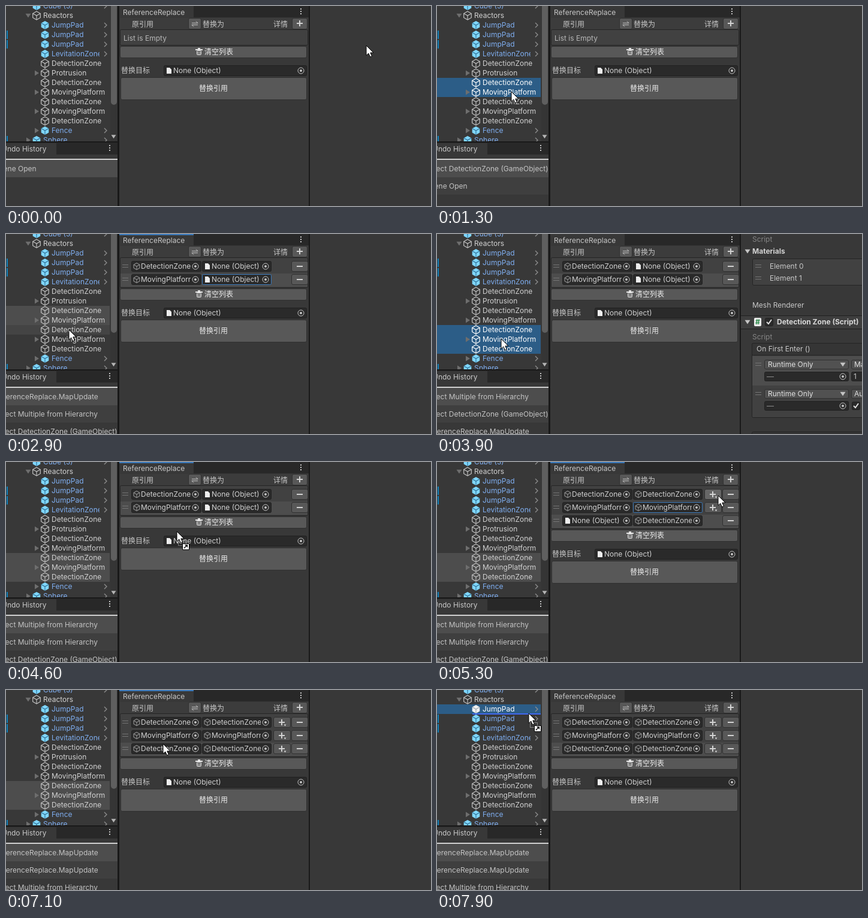
Write an HTML page with a canvas that moves like this. It is 709x334 px and loops after 8000 ms.

```html
<!DOCTYPE html>
<html lang="zh">
<head>
<meta charset="utf-8">
<style>
html, body { margin: 0; width: 100%; height: 100%; overflow: hidden; background: #383838; }
canvas { display: block; }
</style>
</head>
<body>
<canvas id="stage" width="709" height="334"></canvas>
<script>
const c = document.getElementById('stage').getContext('2d');
const FONT = '12px Inter, "Noto Sans CJK SC", "Noto Sans CJK", sans-serif';
const LOOP = 8000, STEP = 100;
const LIGHT = '#d2d2d2', ICON = '#c4c4c4', EDGE = '#242424', BLUE = '#3a79bb';
const DZ = 'DetectionZone', MP = 'MovingPlatform';
const MULTI = 'Select Multiple from Hierarchy';
const SELECT = 'Select DetectionZone (GameObject)';
const UPDATE = 'ReferenceReplace.MapUpdate';

const tree = ['Cube (3)', 'Reactors', 'JumpPad', 'JumpPad', 'JumpPad', 'LevitationZone', DZ,
  'Protrusion', DZ, MP, DZ, MP, DZ, 'Fence', 'Sphere'];
const roots = ['Cube (3)', 'Reactors', 'Sphere'];
const plain = ['Reactors', DZ, MP, 'Protrusion'];
const folded = ['Protrusion', MP, 'Fence', 'Sphere'];

// pointer moves: from time, to time, x, y
const moves = [
  [0, 600, 124, 134], [1000, 1200, 124, 143], [1700, 2200, 478, 50], [2400, 2900, 105, 160],
  [3300, 3600, 107, 190], [3700, 3900, 107, 175], [4300, 4900, 463, 56], [5200, 5300, 469, 56],
  [5300, 6100, 146, 94], [6500, 6800, 276, 97], [7000, 7500, 143, 33], [7700, 7900, 153, 39]
];

// each event overrides part of the state; "log" adds a history entry
const events = [
  [0, { picks: [], rows: [], log: 'Scene Open' }],
  [800, { picks: [8] }],
  [1000, { log: SELECT, inspect: true }],
  [1200, { picks: [8, 9], inspect: false }],
  [1400, { log: MULTI }],
  [1700, { drag: true }],
  [2000, { focus: true }],
  [2400, { drag: false, ring: true, rows: [[DZ], [MP]] }],
  [2500, { log: UPDATE }],
  [3000, { picks: [10], focus: false, ring: false }],
  [3200, { inspect: true }],
  [3300, { log: SELECT }],
  [3600, { picks: [10, 11, 12] }],
  [3700, { log: MULTI }],
  [4000, { log: MULTI, inspect: false }],
  [4300, { drag: true }],
  [4600, { focus: true }],
  [5300, { drag: false, ring: true, rows: [[DZ, DZ], [MP, MP], ['', DZ]] }],
  [5400, { log: UPDATE }],
  [6200, { picks: [6], focus: false, ring: false }],
  [6300, { drag: true }],
  [6700, { focus: true }],
  [7000, { picks: [10, 11, 12], drag: false, rows: [[DZ, DZ], [MP, MP], [DZ, DZ]] }],
  [7100, { log: UPDATE }],
  [7700, { picks: [2], focus: false }],
  [7800, { drag: true }],
  [7900, { insert: true }]
];

function stateAt(t) {
  const due = events.filter(e => e[0] <= t).map(e => e[1]);
  const s = Object.assign({}, ...due);
  s.log = due.map(e => e.log).filter(Boolean).reverse();
  s.tip = moves.reduce(([x, y], [a, b, toX, toY]) => {
    const k = Math.min(1, Math.max(0, (t - a) / (b - a))), ease = k * k * (3 - 2 * k);
    return [x + (toX - x) * ease, y + (toY - y) * ease];
  }, [601, 66]).map(Math.round);
  return s;
}

function rect(x, y, w, h, fill) { c.fillStyle = fill; c.fillRect(x, y, w, h); }

function box(x, y, w, h, fill, edge = EDGE, r = 2) {
  c.beginPath();
  c.roundRect(x + .5, y + .5, w - 1, h - 1, r);
  c.fillStyle = fill; c.fill();
  c.strokeStyle = edge; c.lineWidth = 1; c.stroke();
}
const button = (x, y, w, h, fill = '#585858') => box(x, y, w, h, fill, '#303030', 2.5);
const inset = (x, y, w, h, edge = '#202020') => box(x, y, w, h, '#2a2a2a', edge);

function text(s, x, y, color = '#c8c8c8', bold = false, right = 709) {
  c.save();
  c.beginPath(); c.rect(0, 0, right, 334); c.clip();
  c.font = (bold ? 'bold ' : '') + FONT;
  c.fillStyle = color;
  c.fillText(s, x, y + 4);
  c.restore();
}

function shape(points, fill, edge, width = 1, close = true) {
  c.beginPath();
  points.forEach(([x, y]) => c.lineTo(x, y));
  if (close) c.closePath();
  if (fill) { c.fillStyle = fill; c.fill(); }
  if (edge) { c.strokeStyle = edge; c.lineWidth = width; c.stroke(); }
}
const line = (points, color, width = 1) => shape(points, null, color, width, false);

function cube(x, y, r, fill, edge) {
  const w = r * .9, h = r / 2;
  shape([[x, y - r], [x + w, y - h], [x + w, y + h], [x, y + r], [x - w, y + h], [x - w, y - h]],
    fill, fill ? null : edge, 1.2);
  line([[x - w, y - h], [x, y], [x + w, y - h]], edge, 1.1);
  line([[x, y], [x, y + r]], edge, 1.1);
}

function down(x, y, color = ICON, r = 4.5) { shape([[x - r, y - r * .7], [x + r, y - r * .7], [x, y + r * .8]], color); }
function right(x, y, color) { shape([[x - 3, y - 4.5], [x + 4, y], [x - 3, y + 4.5]], color); }
function kebab(x, y) { for (const d of [-4, 0, 4]) rect(x - 1, y + d - 1, 2, 2, ICON); }
function grip(x, y) { for (const d of [-3, 1]) rect(x, y + d, 10, 1, '#757575'); }

function sign(x, y, plus) {
  rect(x - 5, y - 1, 10, 2, LIGHT);
  if (plus) rect(x - 1, y - 5, 2, 10, LIGHT);
}

function picker(x, y) {
  c.strokeStyle = c.fillStyle = ICON;
  c.lineWidth = 1;
  c.beginPath(); c.arc(x, y, 5, 0, 7); c.stroke();
  c.beginPath(); c.arc(x, y, 2, 0, 7); c.fill();
}

function check(x, y) {
  inset(x, y, 14, 14);
  line([[x + 3, y + 7], [x + 6, y + 10], [x + 11, y + 3]], '#e0e0e0', 2);
}

function field(x, y, w, name, ring) {
  inset(x, y - 9, w, 18, ring ? BLUE : undefined);
  if (name) cube(x + 9, y, 5.5, null, '#8c8c8c');
  else shape([[x + 5, y - 5], [x + 10, y - 5], [x + 13, y - 2], [x + 13, y + 5], [x + 5, y + 5]], '#eeeeee');
  text(name || 'None (Object)', x + 16, y, LIGHT, false, x + w - 18);
  picker(x + w - 10, y);
}

function hierarchy({ picks, focus, drag, insert, tip }) {
  c.save();
  c.beginPath(); c.rect(0, 0, 187, 226); c.clip();
  const hover = drag || tip[0] > 173 ? -1 : Math.floor((tip[1] + 8) / 16);
  tree.forEach((name, i) => {
    const y = i * 16, root = roots.includes(name), prefab = !plain.includes(name);
    const picked = picks.includes(i), bright = picked && !focus, x = root ? 51 : 65;
    if (picked) rect(0, y - 8, 173, 16, focus ? '#4d4d4d' : '#2c5d87');
    else if (i === hover) rect(0, y - 8, 173, 16, '#444444');

    if (name === 'Reactors') down(x - 14, y, '#6e6e6e');
    if (folded.includes(name)) right(x - 14, y, '#6e6e6e');
    if (prefab) {
      cube(x, y, 7, bright ? '#f0f0f0' : '#7fd6fd', bright ? '#9aa6b0' : '#2f6f92');
      line([[164, y - 4], [168, y], [164, y + 4]], '#8c8c8c', 1.4);
    } else cube(x, y, 7, null, bright ? '#ffffff' : ICON);
    text(name, x + 11, y, bright ? '#ffffff' : prefab ? '#7faef0' : LIGHT, false, prefab ? 156 : 173);
    if ([3, 4, 14].includes(i)) rect(1, y - 7, 2, 14, '#0f81be');
  });
  rect(174, 0, 12, 226, '#353535');
  c.beginPath(); c.roundRect(175, -10, 10, 175, 5);
  c.fillStyle = '#5f5f5f'; c.fill();
  down(179.5, 218, '#b4b4b4', 4);
  if (insert) line([[59, 40], [173, 40]], '#4168f0', 2);
  c.restore();
}

function history({ log }) {
  rect(0, 226, 187, 2, '#191919');
  rect(0, 228, 187, 20, '#282828');
  rect(0, 229, 84, 19, '#383838');
  text('Undo History', -7, 239);
  kebab(173, 237);
  rect(0, 255, 186, 2, '#d0d0d0');
  log.slice(0, 3).forEach((name, i) => {
    const y = 257 + i * 29;
    rect(0, y, 186, 29, ['#4d4d4d', '#3f3f3f', '#383838'][i]);
    text(name, -19, y + 15, ICON, false, 186);
  });
}

function mapping([from, to], i, last, { ring, drag, tip }) {
  const y = 54 + i * 22;
  if (last) rect(191, y - 10, 312, 22, '#4d4d4d');
  grip(194, y);
  field(209, y, 117, from);
  field(327, y, 116, to, ring && i === 1);
  if (from && to) {
    const hot = !drag && Math.abs(tip[0] - 460) < 14 && Math.abs(tip[1] - y) < 9;
    button(446, y - 9, 29, 18, hot ? '#676767' : undefined);
    sign(460, y, true);
    down(465.5, y + 5, LIGHT, 2);
  }
  button(476, y - 9, 28, 18);
  sign(490, y, false);
}

function replacer(s) {
  const count = s.rows.length, shift = count && count * 22 - 20;
  rect(189, 0, 317, 19, '#282828');
  rect(189, 0, 124, 20, '#383838');
  if (s.focus) rect(189, 0, 124, 2, BLUE);
  text('ReferenceReplace', 195, 11);
  kebab(492, 9);

  rect(190, 20, 314, 19, '#3c3c3c');
  text('原引用', 210, 31);
  text('替换为', 328, 31);
  text('详情', 446, 31);
  button(304, 20, 22, 19);
  line([[310, 28.5], [320, 28.5], [317, 25.5]], ICON);
  line([[320, 31.5], [310, 31.5], [313, 34.5]], ICON);
  button(477, 20, 26, 19);
  sign(490, 29, true);

  box(190, 39, 314, 27 + shift, '#414141');
  if (!count) text('List is Empty', 196, 54, '#b8b8b8');
  s.rows.forEach((row, i) => mapping(row, i, i === count - 1, s));

  c.save();
  c.translate(0, shift);
  button(190, 67, 312, 20);
  box(318, 74, 8, 8, '#585858', '#e4e4e4', 1);
  rect(316, 72, 12, 2, '#e4e4e4');
  rect(320, 70, 4, 2, '#e4e4e4');
  for (const x of [320, 323]) rect(x, 76, 1, 5, '#e4e4e4');
  text('清空列表', 331, 77, '#eeeeee');
  text('替换目标', 192, 108);
  field(263, 108, 239, '');
  button(191, 119, 311, 38);
  text('替换引用', 322, 138, '#eeeeee');
  c.restore();
}

function inspector() {
  const dim = '#858585';
  text('Script', 526, 9, dim);
  down(518, 29);
  text('Materials', 526, 29, LIGHT, true);
  box(526, 41, 190, 45, '#414141');
  for (const i of [0, 1]) {
    grip(531, 54 + i * 20);
    text('Element ' + i, 555, 54 + i * 20);
  }
  text('Mesh Renderer', 526, 119);

  rect(507, 136, 202, 23, '#1f1f1f');
  rect(507, 137, 202, 21, '#3e3e3e');
  down(518, 147);
  box(529, 140, 12, 14, '#e8e8e8', '#f4f4f4', 1);
  text('#', 531, 147, '#2c8a4a', true);
  check(547, 140);
  text('Detection Zone (Script)', 567, 147, '#d8d8d8', true);
  text('Script', 526, 172, dim);

  box(525, 182, 190, 125, '#414141');
  box(525, 182, 190, 21, '#353535');
  text('On First Enter ()', 533, 192);
  ['Ma', 'Au'].forEach((method, i) => {
    const y = 218 + i * 49;
    if (!i) rect(526, 204, 183, 49, '#4d4d4d');
    grip(531, y);
    button(546, y - 8, 141, 16, '#515151');
    text('Runtime Only', 552, y, '#e0e0e0');
    down(677, y);
    inset(546, y + 12, 141, 16);
    text('—', 550, y + 20, '#909090');
    picker(677, y + 20);
    button(691, y - 8, 30, 16, '#515151');
    text(method, 696, y, '#e0e0e0');
    if (i) return check(692, y + 13);
    inset(691, y + 12, 30, 16);
    text('1', 695, y + 20);
  });
  box(525, 330, 190, 20, '#353535');
}

function cursor({ tip, drag }) {
  c.save();
  c.translate(...tip);
  if (drag) {
    c.setLineDash([1, 1]);
    c.strokeStyle = '#d0d0d0'; c.lineWidth = 1;
    c.strokeRect(2.5, 15.5, 12, 8);
    c.setLineDash([]);
  }
  shape([[0, 0], [0, 16.5], [3.8, 13], [6.5, 19], [9.4, 17.8], [6.8, 12], [12, 12]], '#ffffff', '#000000');
  if (drag) {
    box(9, 20, 12, 11, '#ffffff', '#000000', 0);
    line([[12, 28], [17, 23]], '#000000', 1.5);
    shape([[13, 22], [18, 22], [18, 27]], '#000000');
  }
  c.restore();
}

function draw(t) {
  const s = stateAt(t);
  rect(0, 0, 709, 334, '#383838');
  hierarchy(s);
  history(s);
  replacer(s);
  if (s.inspect) inspector();
  rect(186, 0, 3, 334, '#191919');
  rect(505, 0, 2, 334, '#191919');
  cursor(s);
}

const start = performance.now();
function loop(now) {
  const t = Math.max(0, now - start) % LOOP;
  draw(Math.floor(t / STEP) * STEP);
  requestAnimationFrame(loop);
}
draw(0);
requestAnimationFrame(loop);
</script>
</body>
</html>
```
